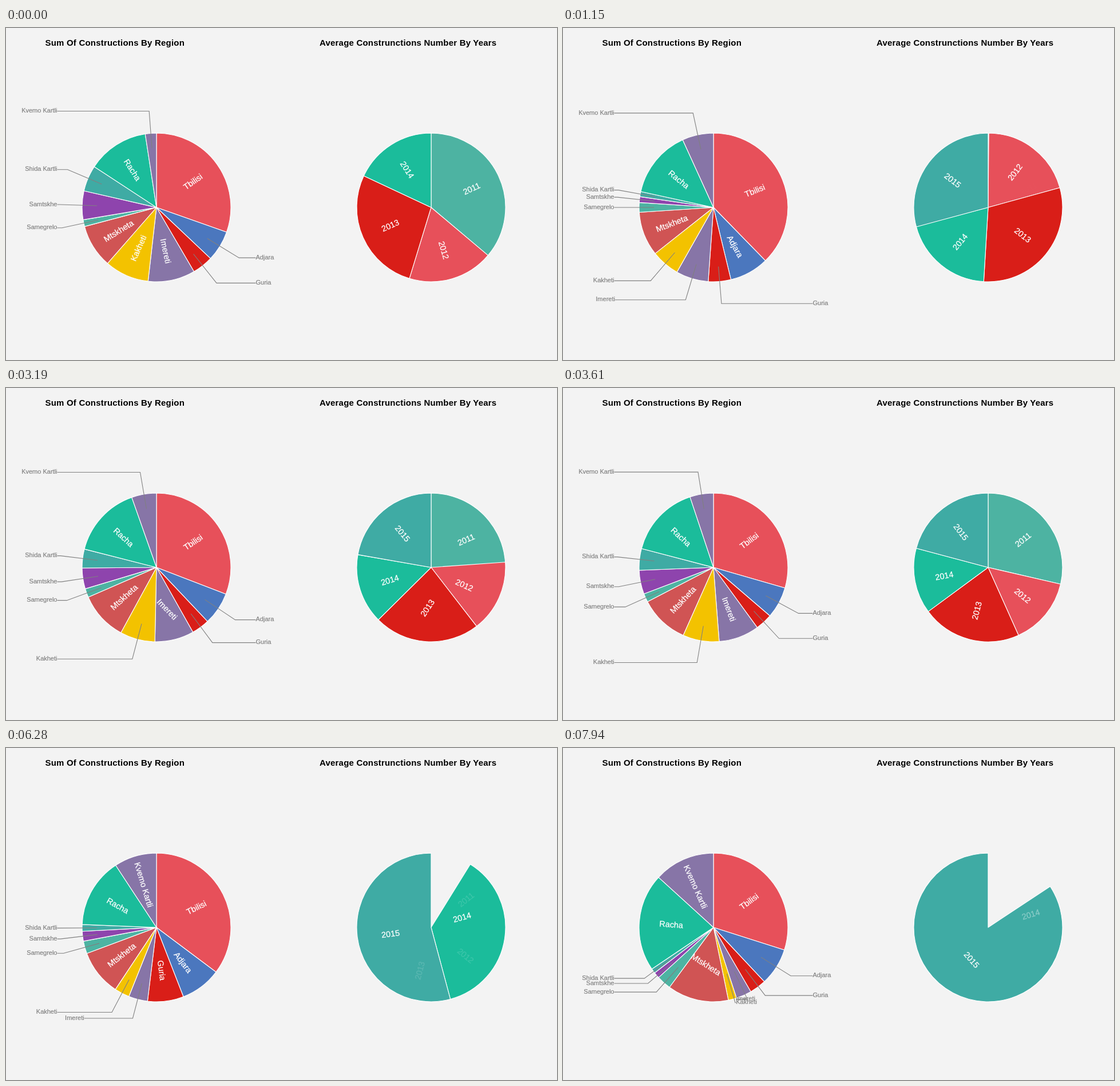
Write an HTML page that moves like this. It is 963x581 px and loops after 8 s.

```html
<!DOCTYPE html>
<html lang="en">
<head>
<meta charset="utf-8">
<title>Construction pies</title>
<style>
  html, body { margin: 0; width: 100%; height: 100%; overflow: hidden; background: #f3f3f3; }
  svg { display: block; width: 963px; height: 581px; font-family: Arial, "Liberation Sans", sans-serif; }
  .title { font-size: 15px; font-weight: bold; letter-spacing: .2px; }
  .slice { stroke: #fff; stroke-width: 1.1; stroke-linejoin: round; }
  .inner { fill: #fff; stroke: #fff; stroke-width: .25; font-size: 14.4px; text-anchor: middle; }
  .outer { fill: gray; stroke: gray; stroke-width: .2; font-size: 11px; }
  .leader { fill: none; stroke: gray; stroke-width: 1.1; }
</style>
</head>
<body>
<svg viewBox="0 0 963 581">
  <text class="title" x="68.5" y="31">Sum Of Constructions By Region</text>
  <text class="title" x="548" y="31">Average Construnctions Number By Years</text>
  <g id="regions" transform="translate(263 314)"></g>
  <g id="years" transform="translate(743 314)"></g>
</svg>
<script>
const LOOP = 8000, DURATION = 1000, RADIUS = 130, MIN_INNER_ANGLE = 30;

const RED = '#e7505a', BLUE = '#4b77be', CRIMSON = '#d91e18', PLUM = '#8775a7', YELLOW = '#f3c200',
  ROSE = '#d05454', MINT = '#4db3a2', VIOLET = '#8e44ad', TEAL = '#3faba4', GREEN = '#1bbc9b';

// Constructions per region in 2011, in 2012 and 2013 together, in 2014 and in 2015
const regions = [
  ['Tbilisi', RED, 91, 513, 262, 195],
  ['Adjara', BLUE, 27, 103, 60, 56],
  ['Guria', CRIMSON, 7, 19, 103, 4],
  ['Imereti', PLUM, 135, 138, 18, 25],
  ['Kakheti', YELLOW, 126, 126, 22, 10],
  ['Mtskheta', ROSE, 138, 122, 9, 116],
  ['Samegrelo', MINT, 13, 18, 11, 25],
  ['Samtskhe', VIOLET, 154, 11, 13, 8],
  ['Shida Kartli', TEAL, 141, 16, 4, 8],
  ['Racha', GREEN, 189, 190, 1, 189],
  ['Kvemo Kartli', PLUM, 9, 50, 10, 115]
].map(([name, color, y11, pair, y14, y15]) =>
  ({ name, color, perYear: [y11, pair * .405, pair * .595, y14, y15] }));

const years = [MINT, RED, CRIMSON, GREEN, TEAL].map((color, i) =>
  ({ name: String(2011 + i), color, total: sum(regions.map(r => r.perYear[i])) }));

// The selected years, as first and last index, and when and how often the picture refreshes on the way there
const selections = [
  { first: 0, last: 3 },
  { first: 1, last: 4, begin: 131, shown: 250, step: 130 },
  { first: 0, last: 4, begin: 2536, shown: 2770, step: 140 },
  { first: 3, last: 4, begin: 5604, shown: 5700, step: 145 },
  { first: 4, last: 4, begin: 7399, shown: 7520, step: 140 }
];

function sum(values) { return values.reduce((a, b) => a + b, 0); }
const mix = (a, b, p) => a + (b - a) * p;
const mixPoint = (a, b, p) => a.map((v, i) => mix(v, b[i], p));
const easeCubic = t => t < .5 ? 4 * t ** 3 : 1 - 4 * (1 - t) ** 3;
const polar = (deg, r) => {
  const a = deg * Math.PI / 180;
  return [r * Math.sin(a), -r * Math.cos(a)];
};

function layout(values) {
  const degrees = 360 / sum(values);
  let end = 0;
  return values.map(value => {
    if (!value) return null;
    const start = end;
    end += value * degrees;
    const mid = (start + end) / 2, right = mid <= 180;
    const elbow = polar(mid, RADIUS * 1.3);
    return {
      start, end, right,
      inside: end - start > MIN_INNER_ANGLE,
      label: polar(mid, RADIUS * .6),
      rotation: mid - (right ? 90 : 270),
      leader: [polar(mid, RADIUS * .8), elbow, [right ? 173.5 : -173.5, elbow[1]]]
    };
  });
}

function blend(from, to, p) {
  // Leaving slices close towards the full turn while their label fades in place
  if (!to) return { ...from, start: mix(from.start, 360, p), end: mix(from.end, 360, p), opacity: 1 - p };
  // Entering slices are in place at once, only their label turns in
  if (!from) return { ...to, rotation: to.rotation + 90 * (1 - p), opacity: 1 };
  return {
    start: mix(from.start, to.start, p),
    end: mix(from.end, to.end, p),
    right: to.right,
    inside: to.inside,
    label: mixPoint(from.label, to.label, p),
    rotation: mix(from.rotation, to.rotation, p),
    leader: from.leader.map((point, i) => mixPoint(point, to.leader[i], p)),
    opacity: 1
  };
}

function sliceMarkup({ start, end }, color) {
  const large = end - start > 180 ? 1 : 0;
  return `<path class="slice" fill="${color}" d="M0 0L${polar(start, RADIUS)}` +
    `A${RADIUS} ${RADIUS} 0 ${large} 1 ${polar(end, RADIUS)}Z"/>`;
}

function labelMarkup(slice, name) {
  if (slice.inside) {
    return `<text class="inner" dy=".35em" opacity="${slice.opacity}" ` +
      `transform="translate(${slice.label}) rotate(${slice.rotation})">${name}</text>`;
  }
  const [x, y] = slice.leader[2];
  return `<polyline class="leader" points="${slice.leader.join(' ')}"/>` +
    `<text class="outer" x="${x}" y="${y + 2.7}" text-anchor="${slice.right ? 'start' : 'end'}">${name}</text>`;
}

const charts = [
  {
    id: 'regions', items: regions,
    layouts: selections.map(({ first, last }) =>
      layout(regions.map(r => sum(r.perYear.slice(first, last + 1)))))
  },
  {
    id: 'years', items: years,
    layouts: selections.map(({ first, last }) =>
      layout(years.map((y, i) => i >= first && i <= last ? y.total : 0)))
  }
];

function draw(index, p) {
  for (const { id, items, layouts } of charts) {
    const before = layouts[Math.max(0, index - 1)], after = layouts[index];
    let slices = '', labels = '';
    items.forEach(({ name, color }, i) => {
      if (!after[i] && (!before[i] || p === 1)) return;
      const slice = blend(before[i], after[i], p);
      slices += sliceMarkup(slice, color);
      labels += labelMarkup(slice, name);
    });
    document.getElementById(id).innerHTML = slices + labels;
  }
}

const origin = performance.now();
function frame() {
  const time = (performance.now() - origin) % LOOP;
  const index = selections.filter(s => s.shown <= time).length;
  if (index) {
    const { begin, shown, step } = selections[index];
    const tick = shown + Math.floor((time - shown) / step) * step;
    draw(index, easeCubic(Math.min(1, (tick - begin) / DURATION)));
  } else {
    draw(0, 1);
  }
  requestAnimationFrame(frame);
}
frame();
</script>
</body>
</html>
```
